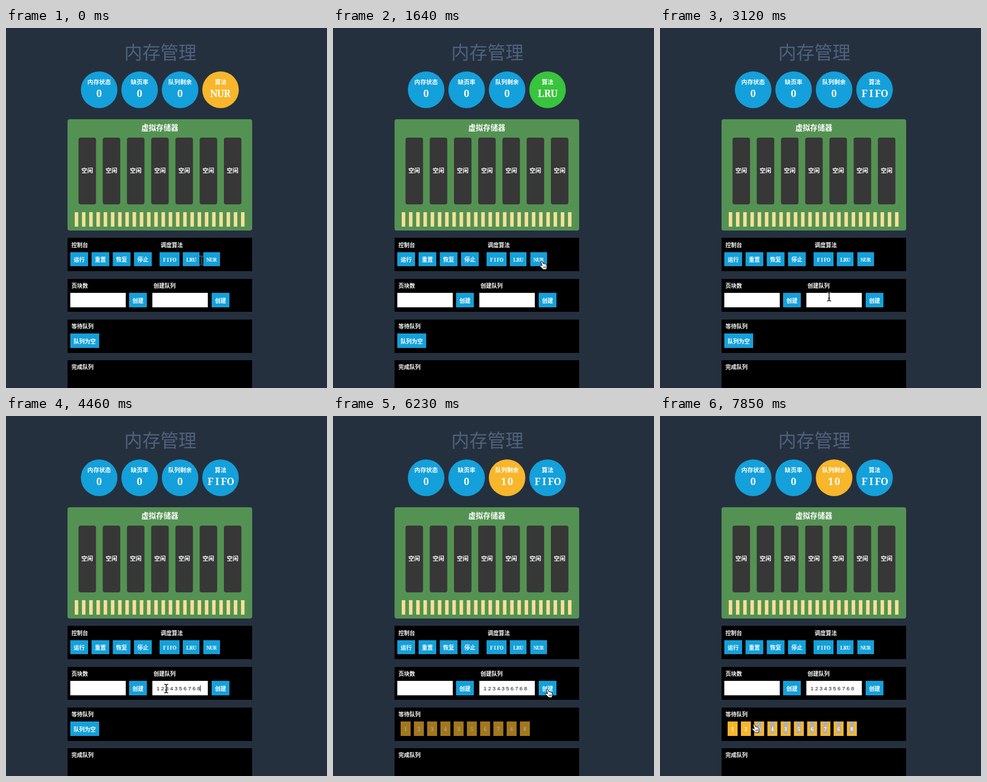
Recreate the animation shown at these times as an HTML page. Size 579 px wide and 647 px high, loop 8000 ms.

```html
<!DOCTYPE html>
<html lang="zh-CN">
<head>
<meta charset="utf-8">
<title>内存管理</title>
<style>
  html, body { margin: 0; width: 100%; height: 100%; overflow: hidden; background: #25303f; }
  svg { display: block; width: 579px; height: 647px; }
  text { font-family: "Noto Sans CJK SC", "Noto Sans CJK", sans-serif; font-weight: 700; fill: #fff; }
  .title { font-weight: 400; fill: #4f627c; }
  .mono { font-family: "Noto Serif", "Liberation Mono", serif; text-anchor: middle; }
  .typed { font-family: "Liberation Sans", Arial, sans-serif; font-weight: 400; fill: #111; }
</style>
</head>
<body>
<svg id="stage" viewBox="0 0 579 647" xmlns="http://www.w3.org/2000/svg">
  <g id="page"></g>
  <g id="hand">
    <path d="M5 8.6 3.2 3Q2.8 1 4.2.8 5.4.7 5.9 2.2L7.2 5.6Q8.6 4.8 9.2 6 10.6 5.4 11.3 6.7 12.8 6.3 13.3 7.9L14 11Q14.2 13 13 14.8V16H7L6.4 15Q4 12.8 1.6 10.4.8 9 2 8.4 3.2 8 5 9.6Z" fill="#fff" stroke="#000"/>
    <path d="M8 10.5V13.5M9.9 10.5V13.5M11.7 10.5V13.5" stroke="#000" stroke-width=".8"/>
  </g>
  <path id="arrow" d="M.5.5V14L3.6 11.2 5.8 16.6 8.2 15.6 6 10.4H10.5Z" fill="#000" stroke="#fff"/>
  <g id="beam" fill="none">
    <path d="M1.5 1Q5 1 5 3.5 5 1 8.5 1M5 3.5V14M1.5 16.5Q5 16.5 5 14 5 16.5 8.5 16.5M3 11.5H7" stroke="#bbb" stroke-width="2"/>
    <path d="M1.5 1Q5 1 5 3.5 5 1 8.5 1M5 3.5V14M1.5 16.5Q5 16.5 5 14 5 16.5 8.5 16.5M3 11.5H7" stroke="#000" stroke-width="1.2"/>
  </g>
</svg>
<script>
const LOOP = 8000;
const BLUE = '#14a0da', ORANGE = '#f8b62a', GREEN = '#38c43c';
const byId = id => document.getElementById(id);
const page = byId('page');

function add(tag, attrs, parent = page) {
  const el = document.createElementNS('http://www.w3.org/2000/svg', tag);
  for (const key in attrs) el.setAttribute(key, attrs[key]);
  parent.appendChild(el);
  return el;
}
const rect = (x, y, width, height, fill, rx = 0, parent = page) =>
  add('rect', { x, y, width, height, fill, rx }, parent);

// cy is the vertical middle of the glyphs
function label(str, x, cy, size, anchor = 'start', parent = page) {
  const el = add('text', { x, y: cy + size * .38, 'font-size': size, 'text-anchor': anchor }, parent);
  el.textContent = str;
  return el;
}

// Letters centred on a fixed pitch
function setMono(el, str, cx, pitch) {
  el.setAttribute('x', [...str].map((_, i) => cx + (i - (str.length - 1) / 2) * pitch).join(' '));
  el.textContent = str;
}
function mono(str, cx, cy, size, pitch, parent = page) {
  const el = add('text', { class: 'mono', y: cy + size * .36, 'font-size': size }, parent);
  setMono(el, str, cx, pitch);
  return el;
}
function button(str, x, y, w, h, parent = page) {
  rect(x, y, w, h, BLUE, 0, parent);
  if (/[A-Z]/.test(str)) mono(str, x + w / 2, y + h / 2 + 1, 9, 6, parent);
  else label(str, x + w / 2, y + h / 2 + .8, 10, 'middle', parent);
}

label('内存管理', 278.5, 44, 32.6, 'middle').setAttribute('class', 'title');

const badges = ['内存状态', '缺页率', '队列剩余', '算法'].map((name, i) => {
  const cx = 168 + i * 73;
  const disc = add('circle', { cx, cy: 111, r: 33, fill: BLUE });
  label(name, cx, 96.5, 10.6, 'middle');
  return { cx, disc, value: mono('0', cx, 117.5, 17.5, 12) };
});
function setBadge(i, str, fill) {
  const b = badges[i];
  setMono(b.value, str, b.cx, 12);
  b.disc.setAttribute('fill', fill);
}

rect(111, 164, 333, 200, '#549253', 4);
label('虚拟存储器', 277.5, 178.5, 13.3, 'middle');
for (let i = 0; i < 7; i++) {
  const x = 130.8 + i * 43.7;
  rect(x, 197, 31.6, 120, '#373737', 4);
  label('空闲', x + 15.8, 256.5, 10.5, 'middle');
}
for (let i = 0; i < 24; i++) rect(124 + i * 13.04, 331, 6.3, 26, '#f6e196');

[[377, 60], [451, 59], [524, 60], [597, 60]].forEach(([y, h]) => rect(111, y, 333, h, '#000'));
[['控制台', 118, 390.5], ['调度算法', 279, 390.5], ['页块数', 118, 463.5],
 ['创建队列', 266, 463.5], ['等待队列', 118, 536.5], ['完成队列', 118, 609.5]]
  .forEach(([str, x, y]) => label(str, x, y, 10));
['运行', '重置', '恢复', '停止'].forEach((str, i) => button(str, 116 + i * 38.3, 403, 32, 25));
button('FIFO', 277, 403, 36, 25);
button('LRU', 319, 403, 30, 25);
button('NUR', 356, 403, 30, 25);
rect(116, 476, 100, 26, '#fff');
button('创建', 222, 476, 32, 26);
rect(264, 476, 100, 26, '#fff');
button('创建', 371, 476, 32, 26);

const typed = label('1 2 3 4 3 5 6 7 6 8', 271.5, 489.6, 9.75);
typed.setAttribute('class', 'typed');
const caret = rect(272, 484, 1, 11, '#222');

const empty = add('g', {});
button('队列为空', 116, 549, 52, 26, empty);

const queue = add('g', {});
const marks = [...'1234356768'].map((digit, i) => {
  const x = 122 + i * 23.9;
  rect(x, 549, 18, 26, ORANGE, 0, queue);
  const mark = rect(x + 5, 549, 8, 22, '#b1b1a9', 0, queue);
  mono(digit, x + 9, 562.8, 9, 6, queue);
  return { x, mark };
});

// [start, pointer, left, top]
const moves = [
  [0, 'beam', 348, 409], [150, 'hand', 320, 421], [440, 'hand', 330, 418],
  [590, 'hand', 316, 418], [740, 'hand', 303, 418], [1190, 'hand', 331, 418],
  [1640, 'hand', 372, 418], [2090, 'hand', 338, 418], [2230, 'hand', 314, 418],
  [2380, 'hand', 304, 418], [2970, 'arrow', 305, 442], [3120, 'beam', 300, 474],
  [3270, 'beam', 302, 482], [3410, 'beam', 306, 487], [3560, 'beam', 308, 489],
  [4310, 'beam', 300, 487], [4460, 'beam', 284, 481], [4600, 'beam', 267, 475],
  [4750, 'beam', 260, 472], [4900, 'beam', 288, 480], [5050, 'beam', 328, 488],
  [5190, 'arrow', 365, 493], [5340, 'hand', 376, 495], [5490, 'hand', 383, 496],
  [5630, 'hand', 382, 490], [6370, 'arrow', 376, 530], [6520, 'arrow', 370, 555],
  [6670, 'arrow', 369, 558], [6970, 'arrow', 365, 562], [7120, 'hand', 335, 568],
  [7260, 'hand', 300, 566], [7410, 'hand', 262, 563], [7560, 'hand', 225, 560],
  [7700, 'hand', 190, 556], [7850, 'hand', 165, 553]
];
const modes = [[0, 'NUR'], [440, 'LRU'], [1040, 'FIFO'], [1490, 'LRU'], [1940, 'NUR'], [2680, 'FIFO']];
const modeColor = { FIFO: BLUE, LRU: GREEN, NUR: ORANGE };
const fades = [[0, 0], [6080, .3], [6230, .66], [6370, .92], [6520, 1]];
const carets = [[0, 0], [3270, 272], [4010, 0], [4460, 350], [4900, 0], [5190, 350], [5490, 0]];

const at = (steps, t) => steps.findLast(step => step[0] <= t);
const show = (el, on) => el.setAttribute('visibility', on ? 'visible' : 'hidden');

function draw(t) {
  const [, kind, left, top] = at(moves, t);
  for (const id of ['hand', 'arrow', 'beam']) {
    show(byId(id), id === kind);
    byId(id).setAttribute('transform', `translate(${left} ${top})`);
  }
  const mode = at(modes, t)[1];
  setBadge(3, mode, modeColor[mode]);

  const created = t >= 5930;
  setBadge(2, created ? '10' : '0', created ? ORANGE : BLUE);
  show(empty, !created);
  queue.setAttribute('opacity', at(fades, t)[1]);
  marks.forEach(({ x, mark }) => show(mark, t >= 7120 && x + 5 > left + 6));

  show(typed, t >= 4010);
  const caretX = at(carets, t)[1];
  show(caret, caretX > 0);
  caret.setAttribute('x', caretX);
}

const start = performance.now();
function tick() {
  draw((performance.now() - start) % LOOP);
  requestAnimationFrame(tick);
}
tick();
</script>
</body>
</html>
```
